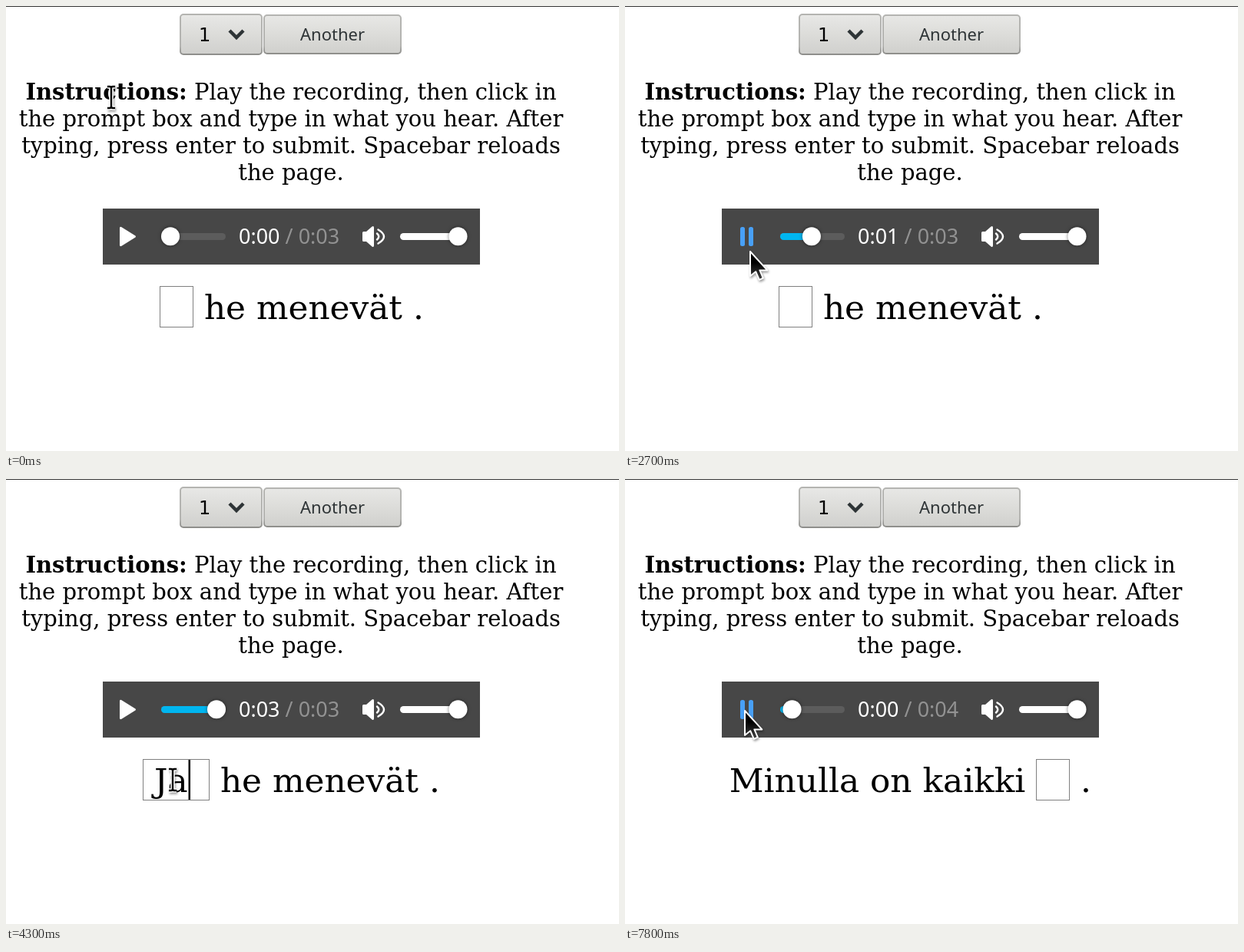
An HTML page that plays this animation: 798x580 px, repeating every 8 s.

```html
<!DOCTYPE html>
<html lang="en">
<head>
<meta charset="utf-8">
<title>Listening exercise</title>
<style>
  html, body { margin: 0; width: 100%; height: 100%; overflow: hidden; background: #fff; }
  svg { display: block; width: 798px; height: 580px; }
  text { white-space: pre; }
  .help { font: 29px "DejaVu Serif", "Noto Serif", serif; text-anchor: middle; }
  .help tspan { font-weight: bold; }
  .line { font: 43.8px "DejaVu Serif", "Noto Serif", serif; }
  .time { font: 27px "Noto Sans", sans-serif; fill: #fff; }
  .knob { fill: #fff; filter: drop-shadow(0 0 2px rgba(0, 0, 0, .55)); }
  .shade { filter: drop-shadow(1px 2px 1.5px rgba(0, 0, 0, .4)); }
</style>
</head>
<body>
<svg viewBox="0 0 798 580" xmlns="http://www.w3.org/2000/svg">
  <defs>
    <linearGradient id="face" x2="0" y2="1">
      <stop offset="0" stop-color="#e8e8e6"/><stop offset="1" stop-color="#d0d0cd"/>
    </linearGradient>
    <linearGradient id="edge" x2="0" y2="1">
      <stop offset=".8" stop-color="#b4b4b1"/><stop offset="1" stop-color="#8e8e8b"/>
    </linearGradient>
    <linearGradient id="ink" x2="0" y2="1">
      <stop offset=".4" stop-color="#000"/><stop offset="1" stop-color="#444"/>
    </linearGradient>
  </defs>

  <rect width="798" height="1" fill="#333"/>
  <g fill="url(#face)" stroke="url(#edge)" stroke-width="2">
    <rect x="227" y="11" width="106" height="52" rx="4"/>
    <rect x="336" y="12" width="178" height="50" rx="4"/>
  </g>
  <text x="251" y="46" font-family="DejaVu Sans, sans-serif" font-size="24">1</text>
  <path d="M291 32l9 9 9-9" fill="none" stroke="#2e3436" stroke-width="4.5"/>
  <text x="425" y="45" font-family="Noto Sans, sans-serif" font-size="22" fill="#2e3436" text-anchor="middle">Another</text>

  <g class="help">
    <text x="371" y="122"><tspan>Instructions:</tspan> Play the recording, then click in</text>
    <text x="371" y="157">the prompt box and type in what you hear. After</text>
    <text x="371" y="192">typing, press enter to submit. Spacebar reloads</text>
    <text x="371" y="227">the page.</text>
  </g>

  <rect x="126" y="264" width="491" height="73" fill="#474747"/>
  <path id="play" d="M148 289.5Q148 287 150.5 288.3L168.5 299.5Q169.5 300.5 168.5 301.5L150.5 312.8Q148 314 148 311.5Z"/>
  <g id="pause">
    <rect x="150" y="288" width="6" height="25" rx="2.5"/>
    <rect x="161" y="288" width="6" height="25" rx="2.5"/>
  </g>
  <rect id="track" x="202" y="296" width="84" height="9" rx="4.5"/>
  <rect id="done" x="202" y="296" height="9" rx="4.5" fill="#00b6f0"/>
  <circle id="knob" class="knob" cy="300.3" r="12"/>
  <text class="time" x="303" y="310"><tspan id="now"></tspan><tspan id="total" fill="#929292"></tspan></text>
  <path d="M464 295.5Q464 294 465.5 294H469L476.5 287.5Q479 286 479 289V312Q479 315 476.5 313.5L469 307H465.5Q464 307 464 305.5Z" fill="#fff"/>
  <g fill="none" stroke="#fff" stroke-width="2.5" stroke-linecap="round">
    <path d="M483 296.5Q487.5 300.5 483 304.5"/>
    <path d="M484.5 291.5Q499.5 300.5 484.5 309.5"/>
  </g>
  <rect x="513" y="296" width="84" height="9" rx="4.5" fill="#fff"/>
  <circle class="knob" cx="588.5" cy="300.3" r="12"/>

  <text id="before" class="line" x="135.7" y="408"></text>
  <rect id="box" y="365.5" height="53" fill="none" stroke="#000" stroke-dasharray="1 1"/>
  <text id="answer" class="line" y="408"></text>
  <rect id="caret" y="366" width="2.5" height="52"/>
  <text id="after" class="line" y="408"></text>

  <g id="arrow" class="shade">
    <path d="M0 0V32L7.2 26.2 11.8 36.8 16.8 34.6 12.4 24.4H22.3Z" fill="url(#ink)" stroke="#fff" stroke-width="2" stroke-linejoin="round"/>
  </g>
  <g id="beam" class="shade" fill="none">
    <path id="stem" d="M-5-14H-2Q0-14 0-12Q0-14 2-14H5M0-12V12M-5 14H-2Q0 14 0 12Q0 14 2 14H5" stroke="#fff" stroke-width="5"/>
    <use href="#stem" style="stroke:#000"/>
    <path d="M-5-14H-2Q0-14 0-12Q0-14 2-14H5M0-12V12M-5 14H-2Q0 14 0 12Q0 14 2 14H5" stroke="#000" stroke-width="2.4"/>
  </g>
</svg>
<script>
const LOOP = 8000, STEP = 100, SPACE = 13.9;
const BLUE = '#48a0f7', PRESSED = '#2d89e6';
const el = Object.fromEntries([...document.querySelectorAll('[id]')].map(e => [e.id, e]));

// Pointer path: time, x, y
const path = [
  [100, 137, 119], [200, 139, 138], [300, 144, 200], [400, 152, 290], [500, 158, 342],
  [600, 160, 349], [700, 160, 324], [800, 160, 309], [2600, 160, 309], [2700, 163, 320],
  [2900, 186, 350], [3100, 213, 374], [3200, 217, 380], [3500, 217, 392], [5000, 217, 392],
  [5100, 183, 354], [5200, 166, 322], [5300, 158, 306], [5400, 156, 302]
];
// Moments at which the player refreshes its position
const ticks = [1400, 1700, 2000, 2300, 2700, 2900, 3200, 3500, 3800];

const set = (e, attrs) => { for (const k in attrs) e.setAttribute(k, attrs[k]); };
const show = (e, on) => set(e, { visibility: on ? 'visible' : 'hidden' });
const within = (t, a, b) => t >= a && t < b;

function pointerAt(t) {
  const i = path.findIndex(p => p[0] > t);
  if (i === 0) return path[0].slice(1);
  if (i < 0) return path[path.length - 1].slice(1);
  const [t0, x0, y0] = path[i - 1], [t1, x1, y1] = path[i];
  const k = (t - t0) / (t1 - t0);
  return [x0 + (x1 - x0) * k, y0 + (y1 - y0) * k];
}

function drawPlayer(t, x, y) {
  const second = t >= 6200, ended = within(t, 4300, 6200);
  const playing = within(t, 1200, 4300) || t >= 7400;
  const pressed = within(t, 1100, 1200) || within(t, 7300, 7400);
  const hover = x < 190 && y > 264 && y < 337 && !within(t, 6200, 6300);
  const fill = pressed ? PRESSED : hover ? BLUE : '#fff';
  set(el.play, { fill });
  set(el.pause, { fill });
  show(el.play, !playing);
  show(el.pause, playing);

  const tick = ticks.filter(s => s <= t).pop();
  let seconds = 0, shift = 0;
  if (second) {
    shift = t >= 7800 ? 3.5 : 0;
  } else if (ended) {
    seconds = 2.73;
    shift = 60;
  } else if (tick) {
    seconds = (tick - 1386) / 1000;
    shift = 22 * seconds;
  }
  set(el.knob, { cx: 214 + shift });
  set(el.done, { width: 12 + shift });
  show(el.done, shift > 0);
  set(el.track, { fill: within(t, 6200, 6500) ? '#141414' : '#5c5c5c' });
  el.now.textContent = '0:0' + Math.round(seconds);
  el.total.textContent = ' / 0:0' + (!second ? 3 : t < 6500 ? 0 : 4);
}

function drawSentence(t) {
  const second = t >= 6200, graded = within(t, 4600, 6200);
  const typed = second || t < 4100 ? '' : t < 4300 ? 'J' : 'Ja';
  const left = second ? 535 : [200, 191, 178][typed.length];
  const width = [43, 61, 86][typed.length];
  const ready = !within(t, 6200, 6300);
  el.before.textContent = second && ready ? 'Minulla on kaikki' : '';
  el.answer.textContent = typed;
  el.after.textContent = !ready ? '' : second ? '.' : 'he menevät .';
  set(el.box, { x: left + .5, width });
  show(el.box, ready && !graded);
  set(el.answer, { x: left + 1 + SPACE, fill: graded ? '#008000' : '#000' });
  set(el.after, { x: left + width + 1 + SPACE - (graded ? 1.3 : 0) });
  set(el.caret, { x: left + [15.5, 33.5, 59.5][typed.length] });
  show(el.caret, within(t, 3500, 4600));
}

function drawPointer(x, y) {
  const overText = y < 232 || (x > 200 && y > 365);
  const transform = `translate(${x} ${y})`;
  set(el.arrow, { transform });
  set(el.beam, { transform });
  show(el.arrow, !overText);
  show(el.beam, overText);
}

function frame(now) {
  const t = Math.floor(now % LOOP / STEP) * STEP;
  const [x, y] = pointerAt(t);
  drawPlayer(t, x, y);
  drawSentence(t);
  drawPointer(x, y);
  requestAnimationFrame(frame);
}
frame(performance.now());
</script>
</body>
</html>
```
